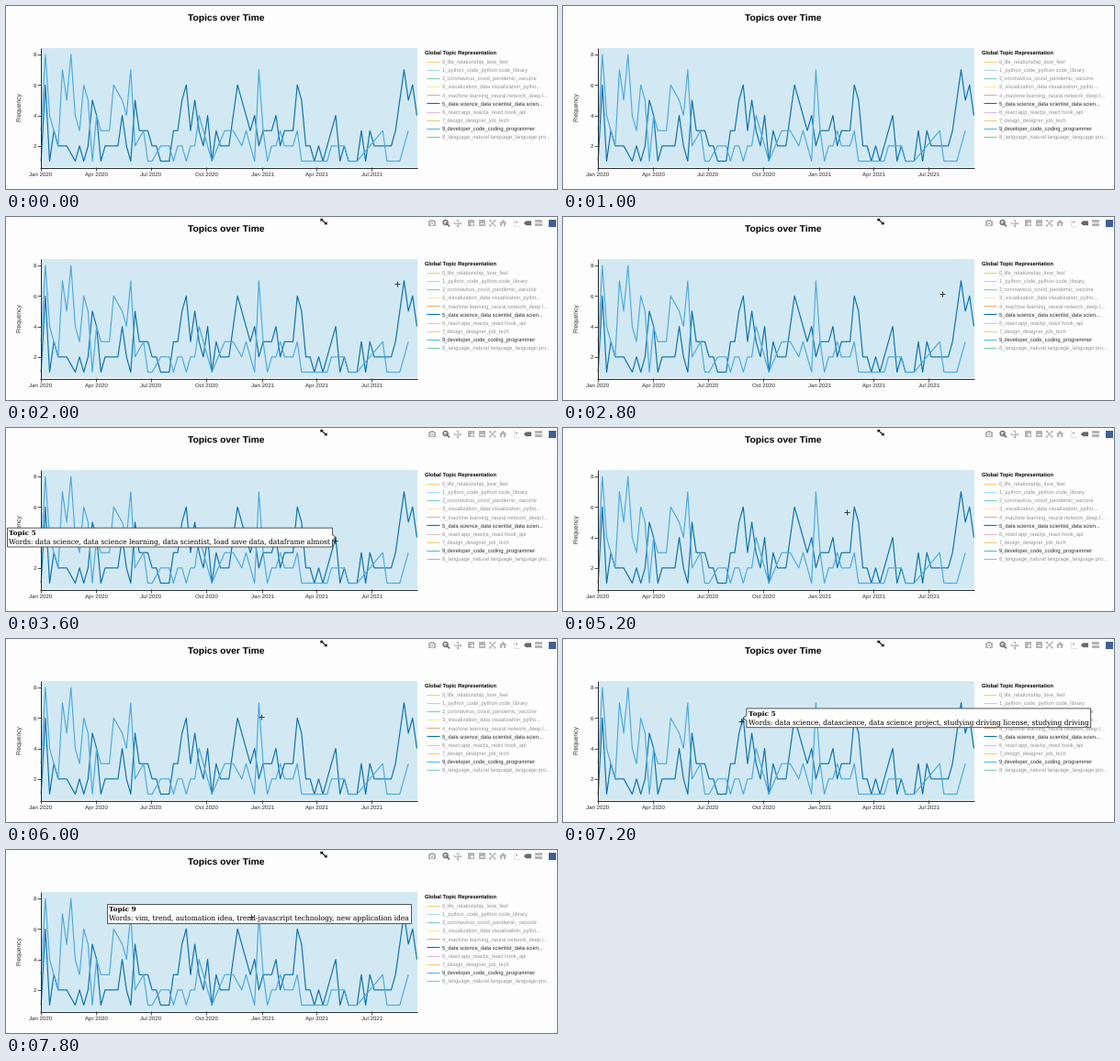
These frames come from a looping animation (600 by 200 pixels, 8000 ms). A matplotlib script:

```python
import numpy as np
import matplotlib.pyplot as plt
from matplotlib.animation import FuncAnimation
from matplotlib.patches import Circle, Polygon, Rectangle

W, H, DPI = 600, 200, 100
STEP, FRAMES = 200, 40
PX = 72 / DPI
INK = "#2a2a2a"

plt.rcParams["text.hinting"] = "none"
fig = plt.figure(figsize=(W / DPI, H / DPI), dpi=DPI, facecolor="#fdfdfd")
ax = fig.add_axes([0, 0, 1, 1])
ax.set_xlim(0, W)
ax.set_ylim(H, 0)
ax.axis("off")


def text(x, y, s, size, color=INK, font="Liberation Sans", **kw):
    return ax.text(x, y, s, fontsize=size * PX, color=color, family=font, **kw)


def line(xs, ys, color=INK, width=1.0, **kw):
    kw.setdefault("solid_capstyle", "butt")
    return ax.plot(xs, ys, color=color, lw=width * PX, **kw)[0]


def patch(shape):
    return ax.add_patch(shape)


# Plot area
LEFT, RIGHT, TOP, BOTTOM = 38, 447.5, 45.5, 176


def px(week):
    return 38.2 + 4.65 * week


def py(value):
    return 53 + (8 - value) * 16.65


patch(Rectangle((LEFT, TOP), RIGHT - LEFT, BOTTOM - TOP, color="#d2e9f3", lw=0))

# Weekly counts; 0 marks a week without data
topic5 = [1, 6, 1, 3, 2, 2, 2, 0, 1, 2, 1, 2, 5, 4, 1, 2, 2, 2, 2, 4,
          2, 1, 5, 3, 3, 3, 2, 2, 1, 1, 1, 3, 3, 5, 6, 3, 5, 3, 2, 4,
          1, 3, 2, 2, 2, 4, 6, 5, 4, 3, 4, 2, 3, 3, 3, 4, 2, 3, 3, 3,
          6, 5, 2, 2, 1, 2, 1, 2, 3, 4, 1, 2, 1, 1, 1, 3, 1, 3, 2, 2,
          2, 2, 2, 3, 5, 7, 5, 6, 4]
topic9 = [3, 8, 4, 3, 2, 7, 5, 8, 4, 3, 6, 5, 1, 4, 3, 3, 3, 6, 0, 5,
          4, 7, 2, 0, 3, 1, 1, 0, 2, 2, 2, 1, 2, 2, 1, 2, 2, 4, 0, 0,
          1, 0, 0, 3, 0, 3, 0, 2, 3, 0, 1, 7, 3, 1, 2, 2, 3, 2, 2, 2,
          3, 1, 1, 1, 1, 1, 1, 1, 2, 2, 2, 2, 1, 1, 1, 0, 0, 0, 0, 0,
          3, 1, 1, 1, 1, 0, 3]

for counts, color in ((topic5, "#0a6fab"), (topic9, "#4ba9dd")):
    v = np.array(counts)
    week = np.flatnonzero(v)
    line(px(week), py(v[week]), color, 1.15, solid_joinstyle="round")

# Axes
line([LEFT - 0.5] * 2, [TOP, BOTTOM + 0.5])
line([LEFT - 1, RIGHT], [BOTTOM + 0.5] * 2)
for v in (2, 4, 6, 8):
    line([34, LEFT], [py(v)] * 2, width=0.8)
    text(32.8, py(v) + 2.2, str(v), 6.1, ha="right")
months = ["Jan 2020", "Apr 2020", "Jul 2020", "Oct 2020",
          "Jan 2021", "Apr 2021", "Jul 2021"]
for x, month in zip((38, 98, 158, 218.7, 279.4, 338.8, 398.8), months):
    line([x - 0.5] * 2, [BOTTOM, BOTTOM + 4], width=0.8)
    text(x, 186, month, 6.1, ha="center")
text(18.8, 110, "Frequency", 6.8, rotation=90, ha="right", va="center")
text(240, 16.2, "Topics over Time", 10.3, "black", weight="bold", ha="center")

# Legend
palette = ["#E69F00", "#56B4E9", "#009E73", "#F0E442",
           "#D55E00", "#0072B2", "#CC79A7"]
legend = ["0_life_relationship_love_feel",
          "1_python_code_python code_library",
          "2_coronavirus_covid_pandemic_vaccine",
          "3_visualization_data visualization_pytho...",
          "4_machine learning_neural network_deep l...",
          "5_data science_data scientist_data scien...",
          "6_react app_reactjs_react hook_api",
          "7_design_designer_job_tech",
          "9_developer_code_coding_programmer",
          "8_language_natural language_language pro..."]
text(456.3, 53.2, "Global Topic Representation", 5.75, "black", weight="bold")
for k, label in enumerate(legend):
    y = 60.5 + 9.17 * k
    alpha = 1 if label[0] in "59" else 0.5
    line([458, 472], [y, y], palette[k % 7], 1.1, alpha=alpha)
    text(474.8, y + 2.1, label, 5.75, alpha=alpha)


# Toolbar
def toolbar():
    g, dark, y = "#b4b4b4", "#6a6a6a", 6.7
    parts = [
        # camera
        patch(Rectangle((460, 4.3), 8, 5.6, color=g, lw=0)),
        patch(Rectangle((462.3, 3.2), 3.4, 1.4, color=g, lw=0)),
        patch(Circle((464, 7), 1.6, fc=g, ec="white", lw=0.7)),
        # magnifier
        patch(Circle((478.6, 6), 2.5, fc="none", ec=dark, lw=1)),
        line([480.4, 483], [7.8, 10.3], dark, 1.6),
        line([477.2, 480], [6, 6], dark, 0.8),
        line([478.6, 478.6], [4.6, 7.4], dark, 0.8),
        # pan
        line([487.5, 495.5], [y, y], g, 1),
        line([491.5, 491.5], [2.7, 10.7], g, 1),
    ]
    for dx, dy in ((1, 0), (-1, 0), (0, 1), (0, -1)):
        tip = np.array([491.5 + 4.3 * dx, y + 4.3 * dy])
        back = np.array([491.5 + 2.5 * dx, y + 2.5 * dy])
        side = 1.5 * np.array([dy, dx])
        parts.append(patch(Polygon([tip, back + side, back - side], color=g, lw=0)))
    # zoom in and out
    for x in (506.7, 518):
        parts += [patch(Rectangle((x - 3.5, 3.2), 7, 7, color=g, lw=0)),
                  line([x - 2, x + 2], [y, y], "white", 1)]
    parts.append(line([506.7] * 2, [4.7, 8.7], "white", 1))
    # autoscale
    parts += [line([526.5, 533], [3.4, 10], g, 1.2),
              line([526.5, 533], [10, 3.4], g, 1.2)]
    for sx in (-1, 1):
        for sy in (-1, 1):
            cx, cy = 529.7 + 3.7 * sx, y + 3.7 * sy
            corner = [(cx, cy), (cx - 2.4 * sx, cy), (cx, cy - 2.4 * sy)]
            parts.append(patch(Polygon(corner, color=g, lw=0)))
    # home
    parts += [
        patch(Polygon([(537, 7), (541.3, 2.8), (545.6, 7)], color=g, lw=0)),
        patch(Rectangle((538.4, 6.6), 2, 3.8, color=g, lw=0)),
        patch(Rectangle((542.2, 6.6), 2, 3.8, color=g, lw=0)),
        # spike lines
        line([552.5, 552.5, 558.5], [3, 9.8, 9.8], g, 0.9, ls=":"),
        patch(Circle((556, 5.5), 1.2, color=g, lw=0)),
        # closest label
        patch(Polygon([(563.8, y), (566.2, 4.3), (572, 4.3), (572, 9.1),
                       (566.2, 9.1)], color=dark, lw=0)),
        # compare labels
        patch(Rectangle((576, 3.4), 8, 2.8, color=g, lw=0)),
        patch(Rectangle((576, 7.2), 8, 2.8, color=g, lw=0)),
        patch(Rectangle((591, 2.8), 8, 8, color="#3f5f96", lw=0)),
        # expand arrow
        line([343.5, 348.5], [2.8, 7.2], "black", 1.1),
        patch(Polygon([(342.3, 1.7), (345.8, 1.9), (342.6, 5)], color="black", lw=0)),
        patch(Polygon([(349.7, 8.3), (346.2, 8.1), (349.4, 5)], color="black", lw=0)),
    ]
    return parts


bar = toolbar()


def tooltip(week, value, topic, words):
    """Label beside its point, or centred on it where neither side has room."""
    x, y = px(week), py(value)
    head = text(0, y - 3.2, f"Topic {topic}", 7.4, "black", "DejaVu Serif",
                weight="bold", zorder=11)
    body = text(0, y + 6.7, "Words: " + words, 7.54, "black", "DejaVu Serif",
                zorder=11)
    ext = body.get_window_extent().transformed(ax.transData.inverted())
    w, h, arrow = abs(ext.width) + 4, 10.4, 3.6
    if x + w < W:
        a = x + arrow
        pts = [(x, y), (a, y - 3), (a, y - h), (a + w, y - h),
               (a + w, y + h), (a, y + h), (a, y + 3)]
    elif x - w > 0:
        b = x - arrow
        a = b - w
        pts = [(x, y), (b, y - 3), (b, y - h), (a, y - h),
               (a, y + h), (b, y + h), (b, y + 3)]
    else:
        a = x - w / 2
        pts = [(a, y - h), (a + w, y - h), (a + w, y + h), (a, y + h)]
    head.set_x(a + 1.8)
    body.set_x(a + 1.8)
    box = patch(Polygon(pts, fc="#fdfdfd", ec="#444444", lw=0.9 * PX, zorder=10))
    return [box, head, body]


# (first ms, last ms, artists)
tips = [
    (2200, 2600, tooltip(85, 7, 5, "data science, datascience, data science "
                         "learning, studying data science, data science model")),
    (3400, 3600, tooltip(69, 4, 5, "data science, data science learning, "
                         "data scientist, load save data, dataframe almost")),
    (7000, 7200, tooltip(34, 6, 5, "data science, datascience, data science "
                         "project, studying driving license, studying driving")),
    (7600, 7800, tooltip(51, 7, 9, "vim, trend, automation idea, "
                         "trend-javascript technology, new application idea")),
]

# Pointer path: ms, x, y
path = np.array([(1400, 462, 44), (2000, 425.5, 73), (2200, 432, 70),
                 (2600, 432, 71), (3400, 357.5, 122), (3600, 357.5, 123),
                 (4600, 332, 97), (6000, 278, 85), (7000, 194, 90),
                 (7200, 194, 90), (7600, 263, 76), (7800, 267, 73)])
cross = [line([], [], INK, 0.9, zorder=12) for _ in range(2)]


def update(k):
    ms = k * STEP
    active = ms >= path[0, 0]
    for part in bar + cross:
        part.set_visible(active)
    x, y = (np.interp(ms, path[:, 0], path[:, c]) for c in (1, 2))
    cross[0].set_data([x - 3, x + 3], [y, y])
    cross[1].set_data([x, x], [y - 3, y + 3])
    for first, last, parts in tips:
        for part in parts:
            part.set_visible(first <= ms <= last)
    return []


anim = FuncAnimation(fig, update, frames=FRAMES, init_func=lambda: update(0),
                     interval=STEP, repeat=True, repeat_delay=0, blit=False)
plt.show()
```
